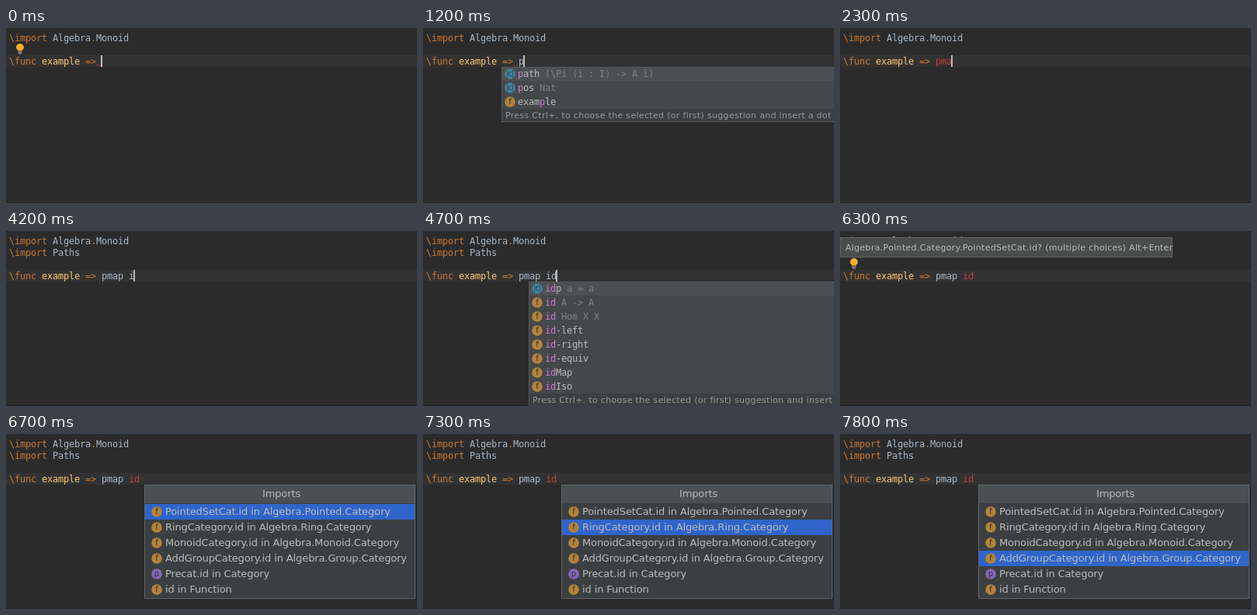
These frames come from a looping animation (529x225 px, 8 s). An HTML page:

```html
<!DOCTYPE html>
<html lang="en">
<head>
<meta charset="utf-8">
<title>Auto import</title>
<style>
html, body { margin: 0; width: 100%; height: 100%; overflow: hidden; background: #2b2b2b; }
svg { display: block; width: 529px; height: 225px; }
text { white-space: pre; }
.mono { font: 12px "DejaVu Sans Mono", monospace; }
.list { font: 13px "DejaVu Sans", sans-serif; }
.small { font: 11px "DejaVu Sans", sans-serif; }
</style>
</head>
<body>
<svg id="stage" viewBox="0 0 529 225" xmlns="http://www.w3.org/2000/svg"></svg>
<script>
const LOOP = 8000;
const stage = document.getElementById('stage');
const C = {
  text: '#a9b7c6', key: '#cc7832', name: '#ffc66d', bad: '#bc3f3c',
  ui: '#bbbbbb', dim: '#808080', match: '#d17ad6'
};

// [start, value] lists: the last entry already begun is current
const TYPED = [[0, ''], [1200, 'p'], [1600, 'pm'], [2000, 'pma'], [2400, 'pmap'],
  [2800, 'pmap '], [4200, 'pmap i'], [4700, 'pmap id'], [5200, 'pmap id ']];
const ERRORS = [[0, [0, 0]], [1900, [0, 2]], [2300, [0, 3]], [2700, [0, 4]], [2800, [0, 0]],
  [3200, [0, 4]], [4000, [0, 0]], [5600, [5, 7]]];
const CARET = [[0, 1], [300, 0], [800, 1], [3700, 0], [4200, 1], [6300, 0]];
const WAVE = [[0, 116], [1900, 0], [3700, 150], [4200, 0]];
const POPUP = [[0, ''], [1200, 'p'], [1600, ''], [4300, 'i'], [4700, 'id'], [5200, ''],
  [5900, 'hint'], [6700, 'imports']];
const PICK = [[0, 0], [7300, 1], [7600, 2], [7800, 3]];

const LOOKUP = {
  p: ['c path (\\Pi (i : I) -> A i)', 'c pos Nat', 'f example'],
  i: ['c idp a = a', 'f id A -> A', 'f inv a = a\'', 'f iso A = B', 'f isSet \\Prop',
    'f inProp A', 'f iterate Nat', 'f example'],
  id: ['c idp a = a', 'f id A -> A', 'f id Hom X X', 'f id-left', 'f id-right',
    'f id-equiv', 'f idMap', 'f idIso']
};
const IMPORTS = ['f PointedSetCat.id in Algebra.Pointed.Category',
  'f RingCategory.id in Algebra.Ring.Category',
  'f MonoidCategory.id in Algebra.Monoid.Category',
  'f AddGroupCategory.id in Algebra.Group.Category',
  'p Precat.id in Category', 'f id in Function'];

const at = (list, t) => list.reduce((v, [start, x]) => t >= start ? x : v, list[0][1]);
const rect = (x, y, w, h, fill, extra = '') =>
  `<rect x="${x}" y="${y}" width="${w}" height="${h}" fill="${fill}" ${extra}/>`;
const span = (s, fill) => s ? `<tspan fill="${fill}">${s}</tspan>` : '';
const text = (cls, x, y, body, fill = C.ui, extra = '') =>
  `<text class="${cls}" x="${x}" y="${y}" fill="${fill}" ${extra}>${body}</text>`;

// Whole-pixel glyph pitch, whatever hinting the browser applies
function setPitch(cls, sample, pitch) {
  stage.innerHTML = text(cls, 0, 0, sample);
  const gap = pitch - stage.firstChild.getComputedTextLength() / sample.length;
  document.styleSheets[0].insertRule(`.${cls} { letter-spacing: ${gap.toFixed(3)}px }`, 0);
}
const PRESS = 'Press Ctrl+. to choose the selected (or first) suggestion and insert a dot';
setPitch('mono', 'm'.repeat(40), 7);
setPitch('list', IMPORTS[3].slice(2), 6.91);
setPitch('small', PRESS, 5.67);

function icon(kind, x, y) {
  const fill = { c: '#4186a0', f: '#b3833b', p: '#8467b5' }[kind];
  const bars = kind === 'c'
    ? `<path d="M${x - 3.5} ${y - 5}v10M${x + 3.5} ${y - 5}v10" stroke="#33505c" fill="none"/>` : '';
  return `<circle cx="${x}" cy="${y}" r="6.8" fill="${fill}"/>${bars}` +
    `<text x="${x}" y="${y + 3.3}" text-anchor="middle" fill="#2d3033" ` +
    `font-family="DejaVu Sans, sans-serif" font-size="10">${kind}</text>`;
}

function bulb(y) {
  return `<path d="M15.5 ${y + 9.5}C15.5 ${y + 8} 13 ${y + 7.5} 13 ${y + 5}a5 5 0 0 1 10 0` +
    `C23 ${y + 7.5} 20.5 ${y + 8} 20.5 ${y + 9.5}z" fill="#f4ae2f"/>` +
    rect(15, y + 10.5, 6, 1, '#b8b8b8') + rect(16, y + 12.5, 4, 1, '#b8b8b8');
}

function wave(x, y) {
  return `<path d="M${x} ${y}l2 -2l2 2l2 -2" fill="none" stroke="${C.bad}" stroke-width=".8"/>`;
}

function importLine(y, ...parts) {
  return text('mono', 4, y, span('\\import ', C.key) +
    parts.map(p => span(p, p === '.' ? C.key : C.text)).join(''));
}

function lookup(prefix, x, y) {
  const rows = LOOKUP[prefix], end = y + rows.length * 18;
  let out = rect(x, y, 440, end - y + 17, '#45484a') + rect(x, y, 440, 18, '#4d5052') +
    rect(x, end, 440, 17, '#3c3f41') +
    rect(x + .5, y + .5, 440, end - y + 16, 'none', 'stroke="#56595b"');
  rows.forEach((row, i) => {
    const [kind, word, ...tail] = row.split(' ');
    const cut = word.indexOf(prefix), ry = y + i * 18;
    const body = cut < 0 ? word : word.slice(0, cut) + span(prefix, C.match) +
      word.slice(cut + prefix.length);
    out += icon(kind, x + 11, ry + 9) +
      text('mono', x + 21, ry + 13, body + span(tail.length ? ' ' + tail.join(' ') : '', C.dim));
  });
  return out + text('small', x + 5, end + 12, PRESS, '#999999');
}

function hint() {
  return rect(.5, 8.5, 427, 25, '#4b4d4d', 'stroke="#606364"') +
    text('small', 7, 25, 'Algebra.Pointed.Category.PointedSetCat.id? (multiple choices) Alt+Enter') +
    bulb(35);
}

function imports(pick) {
  let out = rect(178, 65, 349, 147, '#3c3f41') + rect(179, 66, 347, 23, '#4b5052') +
    rect(178.5, 65.5, 348, 146, 'none', 'stroke="#616466"') +
    text('list', 354.5, 81, 'Imports', C.ui, 'text-anchor="middle"');
  IMPORTS.forEach((row, i) => {
    const y = 90 + i * 20;
    if (i === pick) out += rect(179, y, 347, 20, '#2f65ca');
    out += icon(row[0], 194, y + 10) + text('list', 205, y + 14, row.slice(2));
  });
  return out;
}

function draw(t) {
  const typed = at(TYPED, t), [from, to] = at(ERRORS, t);
  const popup = at(POPUP, t), squiggle = at(WAVE, t);
  const top = t < 2800 ? 35 : 50;
  const caretX = 122 + typed.length * 7;

  let out = rect(0, 0, 529, 225, '#2b2b2b') + rect(0, top, 529, 15, '#323232') +
    rect(0, 224, 529, 1, '#222222') + importLine(17, 'Algebra', '.', 'Monoid');
  if (t >= 2800) out += importLine(32, 'Paths');
  out += text('mono', 4, top + 12, span('\\func ', C.key) + span('example ', C.name) +
    span('=> ', C.key) + span(typed.slice(0, from), C.text) +
    span(typed.slice(from, to), C.bad) + span(typed.slice(to), C.text));
  if (squiggle) out += wave(squiggle, top + 14);
  if (t < 1200) out += bulb(20);
  if (at(CARET, t)) out += rect(caretX, top, 2, 15, '#bbbbbb');

  if (popup === 'hint') out += hint();
  else if (popup === 'imports') out += imports(at(PICK, t));
  else if (popup) out += lookup(popup, popup === 'p' ? 101 : 136, top + 15);
  return out;
}

let last = '';
const began = performance.now();
function tick() {
  const picture = draw((performance.now() - began) % LOOP);
  if (picture !== last) stage.innerHTML = last = picture;
  requestAnimationFrame(tick);
}
tick();
</script>
</body>
</html>
```
